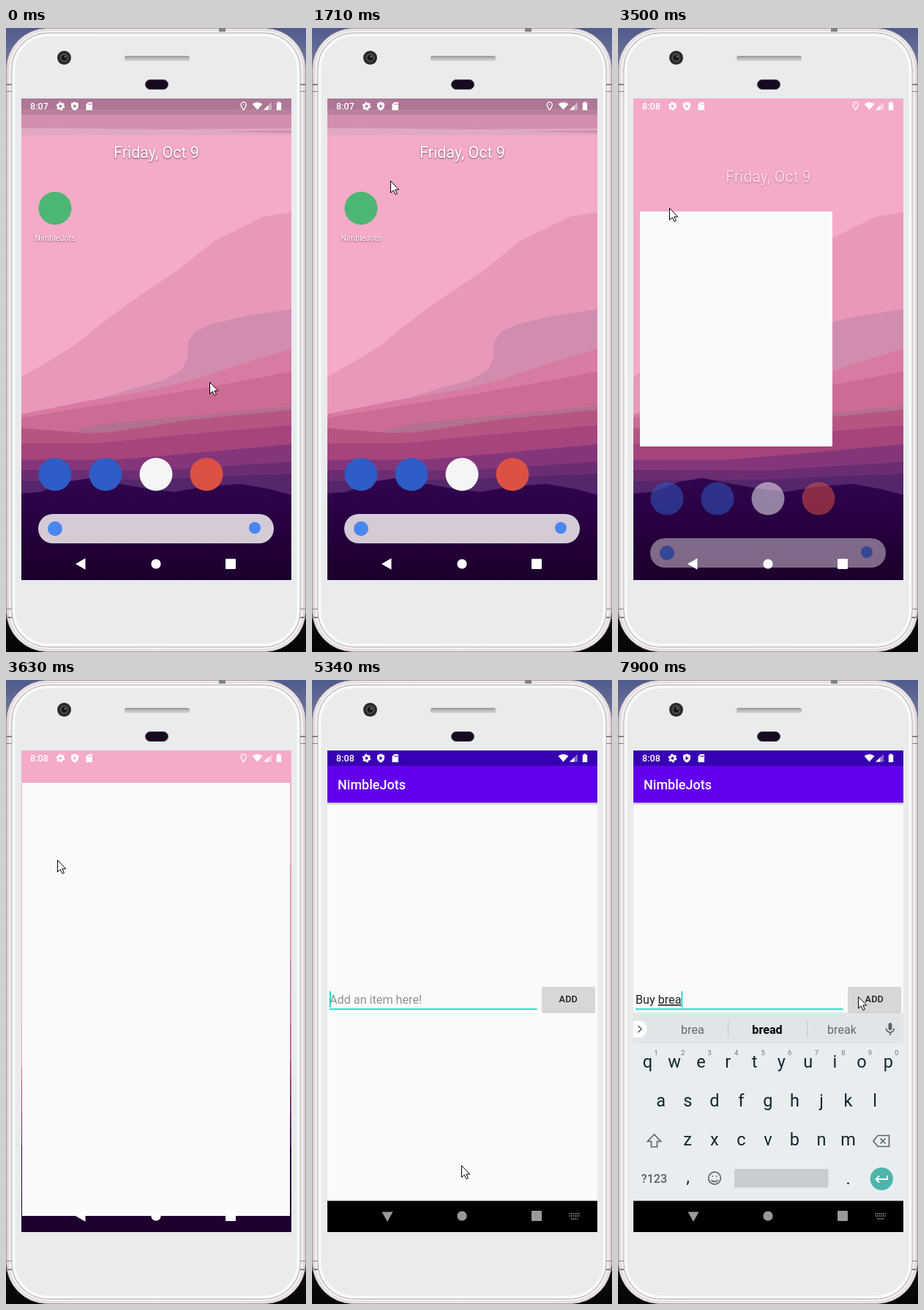
Recreate the animation shown at these times as an HTML page. Size 410x850 px, loop 8000 ms.

```html
<!DOCTYPE html>
<html lang="en">
<head>
<meta charset="utf-8">
<title>To-do app demo</title>
<style>
html, body { margin: 0; width: 100%; height: 100%; overflow: hidden; background: #15131a; }
svg { display: block; width: 100vw; height: 100vh; }
text { font-family: Roboto, "Noto Sans", sans-serif; white-space: pre; }
.mid { text-anchor: middle; }
.bold { font-weight: 500; }
.white { fill: #fff; }
.glow { fill: #fff; text-shadow: 0 1px 2px rgba(70, 20, 60, .7); }
.key { font-size: 23.5px; fill: #10262f; }
.caps .key { text-transform: uppercase; }
.num { font-size: 9.5px; fill: #6c7880; }
.word { font-size: 16.2px; fill: #636b70; }
.word.best { fill: #000; font-weight: 700; }
.line { fill: none; stroke: #5a666d; stroke-width: 1.7; }
</style>
</head>
<body>
<svg viewBox="0 0 410 850" preserveAspectRatio="none">
  <defs>
    <linearGradient id="room" x2="0" y2="1">
      <stop stop-color="#4f5b8c"/><stop offset=".1" stop-color="#8b8ba8"/>
      <stop offset=".88" stop-color="#7a7074"/><stop offset=".95" stop-color="#100d10"/><stop offset="1" stop-color="#050405"/>
    </linearGradient>
    <linearGradient id="edge">
      <stop stop-color="#c9bfc3"/><stop offset=".006" stop-color="#f1edef"/>
      <stop offset=".5" stop-color="#f4f2f3"/>
      <stop offset=".994" stop-color="#f1edef"/><stop offset="1" stop-color="#c9bfc3"/>
    </linearGradient>
    <linearGradient id="hill" x2="0" y2="1">
      <stop stop-color="#30064f"/><stop offset=".45" stop-color="#270040"/><stop offset="1" stop-color="#1c002c"/>
    </linearGradient>
    <linearGradient id="slot" x2="0" y2="1">
      <stop stop-color="#8f9193"/><stop offset=".4" stop-color="#b5b7b9"/><stop offset="1" stop-color="#d3d5d7"/>
    </linearGradient>
    <linearGradient id="fall" x2="0" y2="1">
      <stop stop-color="#000" stop-opacity=".25"/><stop offset="1" stop-color="#000" stop-opacity="0"/>
    </linearGradient>
    <clipPath id="screen"><path d="M21 96h369v656h-369z"/></clipPath>
  </defs>

  <!-- phone body -->
  <path fill="url(#room)" d="M0 0h410v850H0z"/>
  <rect x=".5" y=".5" width="409" height="849" rx="56" fill="url(#edge)" stroke="#a3989d"/>
  <rect x="3" y="3" width="404" height="844" rx="54" fill="none" stroke="#d9c8ce"/>
  <path fill="#858084" d="M291 0h9v5h-9zM0 76h8v2H0zM0 86h8v1H0zM402 76h8v2h-8zM402 86h8v1h-8zM0 791h8v1H0zM0 802h8v2H0zM402 791h8v1h-8zM402 802h8v2h-8z"/>
  <rect x="8" y="7" width="394" height="836" rx="49" fill="#e9ebec" stroke="#9b9699"/>
  <rect x="10.5" y="9.5" width="389" height="831" rx="47" fill="none" stroke="#f8f9f9" stroke-width="4"/>
  <circle cx="79.500" cy="40.500" r="9.500" fill="#29282a"/>
  <circle cx="79.500" cy="40.500" r="6" fill="#4b494c"/>
  <circle cx="79.500" cy="40.500" r="3.800" fill="#161518"/>
  <circle cx="81" cy="39" r="1.300" fill="#777"/>
  <rect x="162" y="38" width="89" height="7" rx="2.500" fill="url(#slot)"/>
  <rect x="190.500" y="70.500" width="31" height="13" rx="6.500" fill="#180a20" stroke="#514b55"/>

  <g clip-path="url(#screen)">
    <g id="home">
      <path fill="#f4aac8" d="M21 96h369v656H21z"/>
      <g id="wall"></g>
      <g id="scrim">
        <path fill="#d38eaf" d="M21 96h369v49H21z"/>
        <path fill="#ad7795" d="M21 96h369v15H21z"/>
        <path fill="#b9809f" d="M21 111h369v7H21z"/>
        <path fill="#dfa9c2" d="M21 136l200 2 169-1v2l-100 2 100 2v3H21z"/>
      </g>
      <g id="items">
        <text class="mid glow" x="205.500" y="177" font-size="21.500">Friday, Oct 9</text>
        <circle cx="67" cy="245.500" r="22.500" fill="#4cb674"/>
        <text class="mid glow" x="67" y="290" font-size="10.800">NimbleJots</text>
        <circle cx="67" cy="608" r="22.500" fill="#2f5cc6"/>
        <circle cx="136" cy="608" r="22.500" fill="#2f5cc6"/>
        <circle cx="205" cy="608" r="22.500" fill="#f5f4f6"/>
        <circle cx="274" cy="608" r="22.500" fill="#dc5144"/>
        <rect x="44" y="662" width="322" height="40" rx="20" fill="#d5cbd6"/>
        <circle cx="67" cy="682" r="10" fill="#4a86f0"/>
        <circle cx="340" cy="681" r="8" fill="#4a86f0"/>
      </g>
    </g>
    <rect id="pane" fill="#fafafa"/>

    <g id="app">
      <path fill="#fafafa" d="M21 96h369v656H21z"/>
      <path fill="#6200ee" d="M21 117h369v50H21z"/>
      <path fill="#3700b3" d="M21 96h369v21H21z"/>
      <rect x="21" y="167" width="369" height="4" fill="url(#fall)"/>
      <text id="title" class="white bold" x="35" y="149" font-size="18">NimbleJots</text>
      <g id="entry">
        <text id="hint" x="24" y="694" font-size="16.200" fill="#929292">Add an item here!</text>
        <text id="typed" x="24" y="694" font-size="16.200" fill="#212121"><tspan id="done"></tspan><tspan id="draft" text-decoration="underline"></tspan></text>
        <rect id="rule" x="24" width="283.500"/>
        <rect id="caret" y="677" width="1.700" height="22" fill="#03dac5"/>
        <rect x="314" y="672" width="73" height="34.500" rx="2" fill="#000" opacity=".18"/>
        <rect x="314" y="671" width="73" height="34" rx="2" fill="#d6d7d7"/>
        <text class="mid bold" x="350.300" y="692" font-size="12.600" letter-spacing=".2" fill="#212121">ADD</text>
      </g>
      <g id="board">
        <path fill="#e9edf0" d="M21 455h369v255H21z"/>
        <path fill="#e0e5e8" d="M21 455h369v40H21z"/>
        <path fill="#000" opacity=".07" d="M21 453h369v2H21z"/>
        <path fill="#c3c9cd" d="M150 464h1v22h-1zM258 464h1v22h-1z"/>
        <path fill="#fff" d="M21 464h7a11.500 11.500 0 0 1 0 23h-7z"/>
        <path class="line" stroke-width="2" d="M27.500 471l4.500 4.500-4.500 4.500"/>
        <rect x="369.500" y="467" width="5" height="10" rx="2.500" fill="#56626a"/>
        <path class="line" d="M366.500 474.500a5.500 5.500 0 0 0 11 0M372 480v4"/>
        <g id="words"></g>
        <g id="keys"></g>
        <path class="line" d="M49.500 619l-9 9.500h5v7.500h8v-7.500h5z"/>
        <path class="line" d="M355 620.500h15.500v15H355l-6-7.500zM358.500 624.500l7 7M365.500 624.500l-7 7"/>
        <text class="mid bold" x="49.500" y="685" font-size="16.200" fill="#55616a">?123</text>
        <text class="mid key" x="95.500" y="685">,</text>
        <circle class="line" cx="132" cy="678.500" r="8.300"/>
        <path class="line" d="M127.500 681a5 4 0 0 0 9 0M128.500 676h1.800M133.700 676h1.800"/>
        <rect x="159" y="666" width="128.500" height="25.500" rx="2" fill="#c8cdd0"/>
        <text class="mid key" x="314.500" y="687">.</text>
        <circle cx="360.300" cy="679.500" r="15.600" fill="#4db6ac"/>
        <path fill="none" stroke="#fff" stroke-width="1.800" d="M368 675v5h-15M357 675.500l-4.500 4.500 4.500 4.500"/>
      </g>
      <path d="M21 709.500h369V752H21z"/>
    </g>

    <!-- system bars -->
    <g fill="#fff">
      <text id="clock" class="bold" x="33" y="111" font-size="12.600"></text>
      <circle cx="74.500" cy="106.500" r="3.300" fill="none" stroke="#fff" stroke-width="2.800"/>
      <circle cx="74.500" cy="106.500" r="5" fill="none" stroke="#fff" stroke-width="1.800" stroke-dasharray="2.600 2.636"/>
      <path fill-rule="evenodd" d="M94 100.500l5 2v4q-.5 4-5 6-4.500-2-5-6v-4zM92.500 103.800v5.400l4.200-2.700z"/>
      <path fill-rule="evenodd" d="M112.500 101h5.500v11h-8.500v-8zM112.500 102.800v2h1v-2zM114.300 102.800v2h1v-2zM116 102.800v2h1v-2z"/>
      <path id="pin" fill="none" stroke="#fff" stroke-width="1.300" d="M324.700 111.500q-3.600-4.500-3.600-7a3.600 3.600 0 0 1 7.200 0q0 2.500-3.600 7zM324.200 104.500h1"/>
      <path d="M336.500 103.500q7-5 14 0l-7 8z"/>
      <path opacity=".4" d="M363 101v10.500h-11z"/>
      <path d="M358.500 105.300v6.200H352z"/>
      <path d="M371.500 100.500h3v1.300h1.700v10.200h-6.400v-10.200h1.700z"/>
    </g>
    <g id="nav">
      <path id="back" d="M95 730l13.500-7.800v15.600z"/>
      <path id="fold" d="M95.500 724.500h15L103 738z"/>
      <circle cx="205" cy="730" r="6.600"/>
      <rect x="300" y="723" width="14" height="14" rx="1"/>
      <path id="dots" fill="none" stroke="#999" stroke-width="1.600" stroke-dasharray="1.700 1" d="M351.500 727h14.500M351.500 730h14.500M354 734h9.500"/>
    </g>
  </g>
  <path id="mouse" fill="#fff" stroke="#000" stroke-linejoin="round" d="M.5.500v16l3.700-3.400 2.700 5.600 2.500-1.100-2.600-5.500h4.900z"/>
</svg>

<script>
const LOOP = 8000;
const $ = id => document.getElementById(id);
const show = (id, on) => $(id).setAttribute('display', on ? 'inline' : 'none');
const set = (id, attrs) => Object.entries(attrs).forEach(([k, v]) => $(id).setAttribute(k, v));

// Wallpaper bands: colour and upper edge; each is filled down to the next.
const bands = [
  ['#e998b9', '21 475 55 456 90 435 125 407 165 377 200 353 235 330 262 308 285 290 330 268 352 257 390 251'],
  ['#d18db0', '21 527 110 511 170 492 215 480 240 466 248 450 249 427 258 414 282 403 330 392 390 383'],
  ['#d87ba4', '21 526 110 508 200 493 260 478 330 455 390 437'],
  ['#cc6b95', '21 531 100 518 200 502 300 485 390 468'],
  ['#b65584', '21 545 100 551 180 538 300 524 390 517'],
  ['#a5457c', '21 566 120 566 250 553 390 541'],
  ['#85367a', '21 588 150 588 270 578 390 567'],
  ['#6b2d72', '21 602 200 603 390 591'],
  ['#55266a', '21 617 200 615 390 607'],
  ['url(#hill)', '21 634 47 632 84 618 116 613 150 620 190 627 230 632 270 625 320 621 360 628 390 636']
];
$('wall').innerHTML = bands.map(([c, edge]) => `<polygon fill="${c}" points="${edge} 390 752 21 752"/>`).join('') +
  '<path fill="#b3708f" d="M98 547l45-9 137-12 110-11v5l-140 14-110 17-38 1z"/>';

const label = (cls, x, y, s) => `<text class="mid ${cls}" x="${x}" y="${y}">${s}</text>`;
const rows = [['qwertyuiop', 40.5, 528], ['asdfghjkl', 58.7, 581], ['zxcvbnm', 95.2, 634]];
$('keys').innerHTML = rows.map(([keys, x0, y], r) => [...keys].map((k, i) => {
  const x = x0 + i * 36.55;
  return label('key', x, y, k) + (r ? '' : label('num', x + 11.5, 511, (i + 1) % 10));
}).join('')).join('');

const path = [
  [0, 278, 482], [140, 250, 450], [280, 230, 423], [420, 176, 344], [560, 142, 288],
  [690, 110, 215], [830, 66, 175], [970, 20, 210], [1110, 16, 260], [1260, 30, 300],
  [1410, 70, 313], [1560, 118, 265], [1710, 107, 208], [1870, 64, 185], [1990, 18, 215],
  [2120, 22, 280], [2260, 60, 313], [2410, 115, 300], [2540, 129, 250], [2680, 105, 215],
  [2810, 80, 235], [2950, 70, 245], [4210, 72, 250], [4360, 76, 257], [4510, 95, 300],
  [4650, 130, 390], [4790, 170, 500], [4920, 195, 600], [5060, 204, 661],
  [5460, 215, 640], [5600, 260, 540], [5730, 310, 455], [5860, 328, 431]
];
// x, y, width, height of the opening window; then drift and opacity of the home items
const opening = [
  [0, 0, 0, 0, 0, 0, 1], [3380, 40, 222, 90, 86, 10, .85],
  [3500, 30, 250, 263, 320, 33, .52], [3630, 22, 140, 366, 590, 33, 0]
];
const slide = [[0, 255, 0], [5460, 130, .5], [5600, 18, .95], [5730, 0, 1]];
const blink = [[0, 0], [5200, 1], [5860, 0], [6250, 1], [6780, 0], [6930, 1]];
// settled text, text being composed, suggestions
const typing = [
  [0, '', '', 'thanks', 'I', 'we'],
  [7070, '', 'B', 'B', 'But', 'By'],
  [7210, '', 'Bu', 'Bu', 'But', 'Bus'],
  [7350, '', 'Buy', 'But', 'Buy', 'Bus'],
  [7480, 'Buy ', '', 'a', 'the', 'it'],
  [7620, 'Buy ', 'b', 'b', 'but', 'by'],
  [7750, 'Buy ', 'br', 'br', 'bring', 'bro'],
  [7900, 'Buy ', 'brea', 'brea', 'bread', 'break']
];
const at = (steps, t) => steps.findLast(s => s[0] <= t).slice(1);

function render(t) {
  const [mx, my] = at(path, t);
  set('mouse', { transform: `translate(${mx} ${my})` });
  $('clock').textContent = t < 2680 ? '8:07' : '8:08';
  show('pin', t < 4210);

  const [x, y, width, height, drift, opacity] = at(opening, t);
  set('pane', { x, y, width, height });
  set('items', { transform: `translate(0 ${drift})`, opacity });
  show('scrim', t < 3380);
  show('app', t >= 3770);
  show('title', t >= 3910);
  show('entry', t >= 3910);

  const focus = t >= 5200;
  set('entry', { transform: `translate(0 ${t >= 5340 ? -253 : 0})` });
  set('rule', focus ? { y: 700.5, height: 1.7, fill: '#03dac5' } : { y: 701, height: 1, fill: '#929292' });
  set('nav', { fill: focus ? '#999' : '#fff' });
  show('back', !focus);
  show('fold', focus);
  show('dots', focus);

  const [dy, alpha] = at(slide, t);
  set('board', { transform: `translate(0 ${dy})`, opacity: alpha });
  $('keys').classList.toggle('caps', t >= 6930 && t < 7210);

  const [done, draft, ...words] = at(typing, t);
  $('done').textContent = done;
  $('draft').textContent = draft;
  show('hint', !(done + draft));
  $('words').innerHTML = words.map((w, i) =>
    label(i === 1 && draft ? 'word best' : 'word', 102 + i * 102, 482, w)).join('');
  const end = done + draft ? $('typed').getComputedTextLength() : 0;
  set('caret', { x: 24 + end });
  show('caret', at(blink, t)[0]);
}

const start = performance.now();
function tick() {
  render((performance.now() - start) % LOOP);
  requestAnimationFrame(tick);
}
tick();
</script>
</body>
</html>
```
